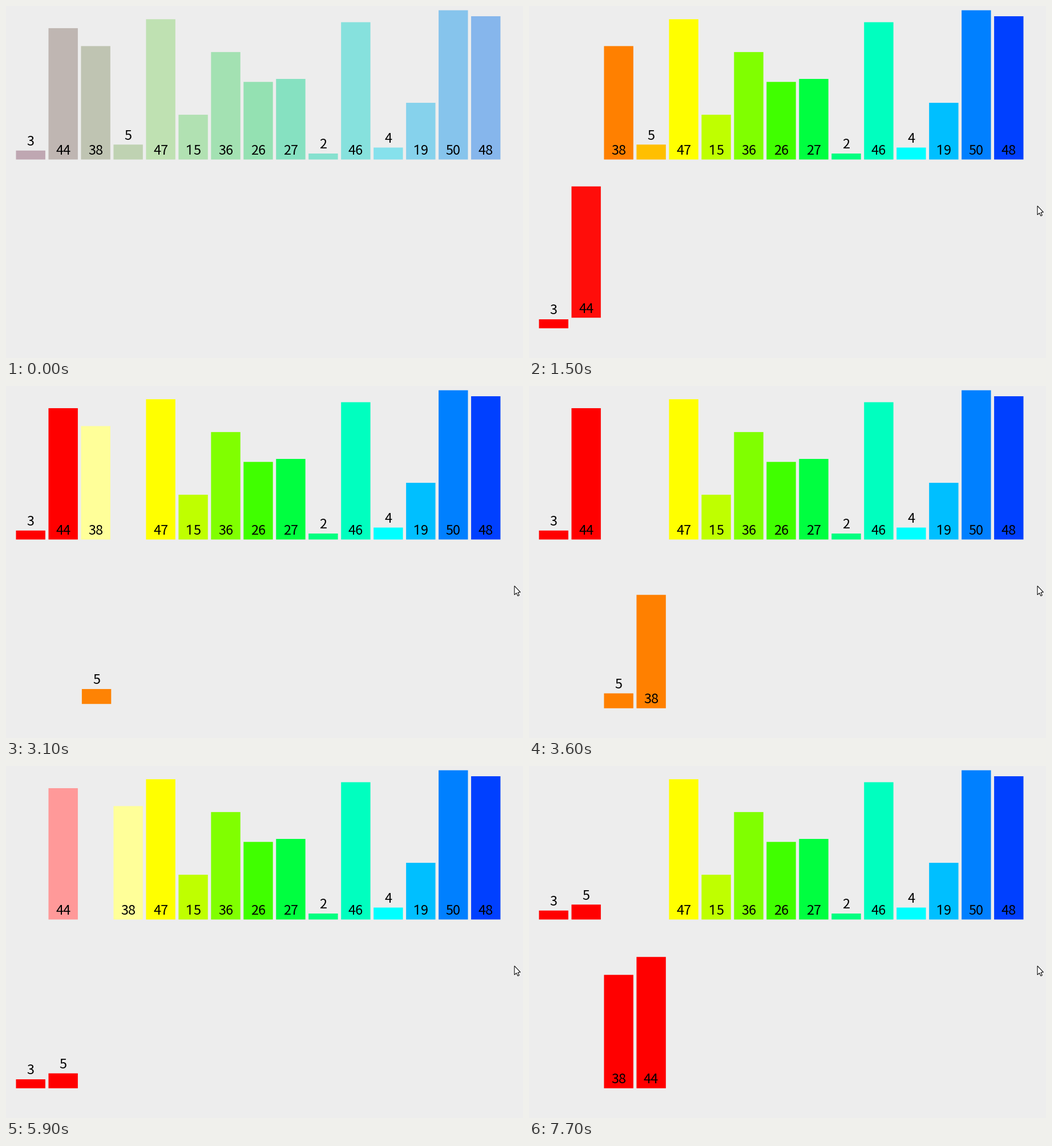
Write a matplotlib script that moves like this. It is 906 px wide and 618 px high and loops after 8 s.

```python
import colorsys
import numpy as np
import matplotlib.pyplot as plt
from matplotlib.animation import FuncAnimation
from matplotlib.patches import Polygon, Rectangle

W, H, DPI = 906, 618, 100
STEP, LOOP, FADE = 100, 8000, 240

VALUES = [3, 44, 38, 5, 47, 15, 36, 26, 27, 2, 46, 4, 19, 50, 48]
LEFT, PITCH, BAR_W, UNIT = 17.5, 56.97, 51.4, 5.24
TOP_BASE, LOW_BASE = 269.5, 565.8
LABEL_GAP, FONT_PX = 8.6, 23.5
DIGIT = 0.555 * FONT_PX

START = np.array([173, 216, 230]) / 255


def hue(degrees, saturation=1):
    return colorsys.hsv_to_rgb(degrees / 360, saturation, 1)


def strong(i):
    # the rainbow leaves out pure green
    return hue(15 * (i + (i >= 8)))


def pale(i):
    return hue(30 * i, 0.4)


def merge(left, right, first):
    """Steps that merge two sorted runs of bars; the first slot is given.

    A step is a list of (bar, slot, level, colour); level 1 is the lower row.
    """
    both = left + right
    own = strong(first)

    def highlight(bar):
        group = first if bar in left else first + len(left)
        return bar, first + both.index(bar), 0, pale(group)

    steps = [[highlight(left[0]), highlight(right[0])]]
    order = sorted(both, key=lambda bar: VALUES[bar])
    for slot, bar in enumerate(order, first):
        run = left if bar in left else right
        following = run[run.index(bar) + 1:][:1]
        steps.append([(bar, slot, 1, own)] + [highlight(b) for b in following])
    steps += [[(bar, slot, 0, own)] for slot, bar in enumerate(order, first)]
    return steps


STEPS = [[(i, i, 0, strong(i)) for i in range(len(VALUES))]]
STEPS += merge([0], [1], 0) + merge([2], [3], 2) + merge([0, 1], [3, 2], 0)

# start times: an uneven beginning, then a steady beat
TIMES = np.interp(range(18), [0, 2, 3, 4, 6, 17],
                  [-92, 740, 1320, 1540, 2450, 7450])


def ease(t):
    t = min(max(t, 0), 1)
    return 4 * t ** 3 if t < 0.5 else 1 - 4 * (1 - t) ** 3


def bar_states(ms):
    """Rows of slot, level, r, g, b."""
    rows = [np.array([i, 0, *START]) for i in range(len(VALUES))]
    for begin, step in zip(TIMES, STEPS):
        p = ease((ms - begin) / FADE)
        for bar, slot, level, colour in step:
            rows[bar] = rows[bar] + p * (np.array([slot, level, *colour]) - rows[bar])
    return rows


fig = plt.figure(figsize=(W / DPI, H / DPI), dpi=DPI, facecolor="#ededed")
ax = fig.add_axes([0, 0, 1, 1])
ax.set_xlim(0, W)
ax.set_ylim(H, 0)
ax.axis("off")

# a "1" without a foot, measured from the left end of the baseline
ONE = np.array([(6.3, 0), (8.4, 0), (8.4, -17.3), (7.5, -17.3),
                (2.1, -14.6), (2.1, -12.5), (6.3, -14.7)])


class Bar:
    def __init__(self, value, order):
        self.height = value * UNIT
        self.lift = LABEL_GAP + (self.height if value < 10 else 0)
        self.rect = ax.add_patch(Rectangle((0, 0), BAR_W, self.height, lw=0,
                                           snap=False, zorder=1 + order / 100))
        text = str(value)
        self.one = None
        self.shift = 0
        if text[0] == "1":
            self.one = ax.add_patch(Polygon(ONE, fc="black", lw=0, zorder=3))
            text, self.shift = text[1:], DIGIT / 2
        self.label = ax.text(0, 0, text, family="Noto Sans CJK JP",
                             size=FONT_PX * 72 / DPI, color="black",
                             ha="center", va="baseline", zorder=3)

    def place(self, slot, level, *colour):
        x = LEFT + PITCH * slot
        base = TOP_BASE + level * (LOW_BASE - TOP_BASE)
        self.rect.set_xy((x, base - self.height))
        self.rect.set_facecolor(np.clip(colour, 0, 1))
        mid, line = x + BAR_W / 2, base - self.lift
        self.label.set_position((mid + self.shift, line))
        if self.one:
            self.one.set_xy(ONE + (mid - DIGIT, line))


bars = [Bar(v, i) for i, v in enumerate(VALUES)]

ARROW = np.array([(0, 0), (0, 15.6), (3.5, 12.4), (5.9, 17.6),
                  (8.3, 16.5), (6, 11.4), (10.4, 11)])
cursor = ax.add_patch(Polygon(ARROW, fc="white", ec="black", lw=0.75,
                              joinstyle="miter", zorder=5))
CURSOR_IN = 400


def draw(frame):
    ms = frame * STEP
    for bar, row in zip(bars, bar_states(ms)):
        bar.place(*row)
    # the pointer glides in from the right and slows to rest
    cursor.set_visible(ms >= CURSOR_IN)
    left_over = 0.36 ** (max(ms - CURSOR_IN, 0) / 100)
    cursor.set_xy(ARROW + (891 + 12 * left_over ** 2, 351 - 186 * left_over))
    return []


anim = FuncAnimation(fig, draw, frames=LOOP // STEP, interval=STEP,
                     init_func=lambda: draw(0), repeat=True, repeat_delay=0,
                     cache_frame_data=False)
plt.show()
```
